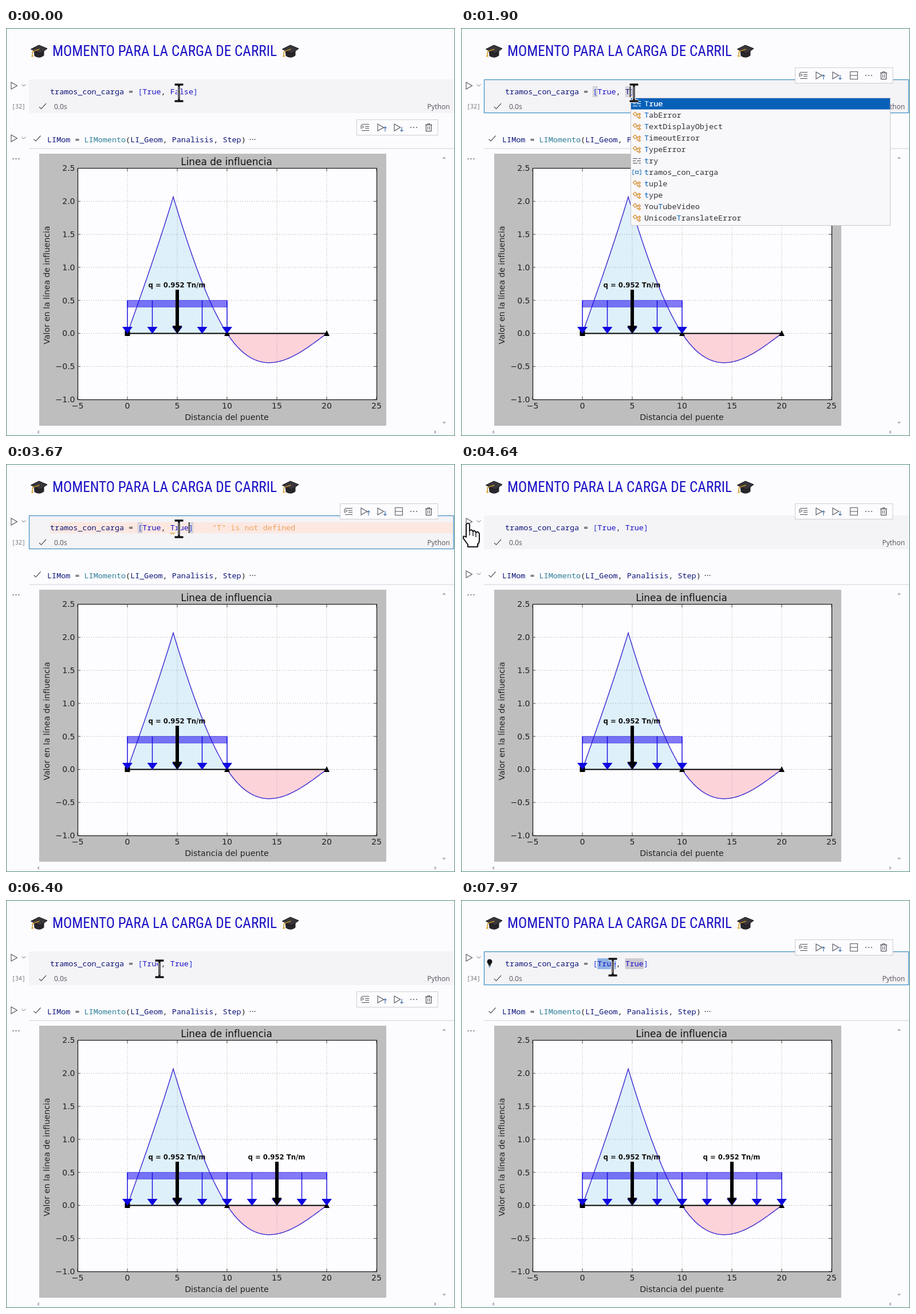
An HTML page with a canvas that plays this animation: 784 px wide and 714 px high, repeating every 8 s.

```html
<!DOCTYPE html>
<html lang="es">
<head>
<meta charset="utf-8">
<title>Línea de influencia</title>
<style>
html, body { margin: 0; width: 100%; height: 100%; overflow: hidden; background: #fcfcfe; }
canvas { display: block; width: 784px; height: 714px; }
</style>
</head>
<body>
<canvas id="stage" width="784" height="714"></canvas>
<script>
const c = document.getElementById('stage').getContext('2d');
const LOOP = 8000;
const MONO = '13.44px "Noto Sans Mono", "DejaVu Sans Mono", monospace';
const UI = '12px "Open Sans", "Noto Sans", sans-serif';
const plotFont = (px, weight = '') => `${weight} ${px}px "DejaVu Sans", sans-serif`;
const INK = '#55525c', NAVY = '#0c1478', BLUE = '#1a10c4', TEAL = '#2f7f99';

// ---- helpers ----
function rect(x, y, w, h, fill, stroke, lw = 1) {
  if (fill) { c.fillStyle = fill; c.fillRect(x, y, w, h); }
  if (stroke) { c.strokeStyle = stroke; c.lineWidth = lw; c.strokeRect(x, y, w, h); }
}

function path(points, stroke, lw = 1, fill, close) {
  c.beginPath();
  points.forEach(([x, y]) => c.lineTo(x, y));
  if (close) c.closePath();
  if (fill) { c.fillStyle = fill; c.fill(); }
  if (stroke) { c.strokeStyle = stroke; c.lineWidth = lw; c.stroke(); }
}

function dot(x, y, r, fill) {
  c.beginPath();
  c.arc(x, y, r, 0, 7);
  c.fillStyle = fill;
  c.fill();
}

function text(s, x, y, font, color, align = 'left') {
  c.font = font;
  c.fillStyle = color;
  c.textAlign = align;
  c.fillText(s, x, y);
}

function tokens(list, x, y) {
  for (const [s, color] of list) {
    text(s, x, y, MONO, color);
    x += c.measureText(s).width;
  }
}

function at(x, y, draw) {
  c.save();
  c.translate(x, y);
  draw();
  c.restore();
}

// ---- small icons, drawn around their centre ----
const play = (x, y, s = 1) =>
  path([[x - 5 * s, y - 6 * s], [x + 5.5 * s, y], [x - 5 * s, y + 6 * s]], INK, 1.1, null, true);
const chevron = (x, y) => path([[x - 3.5, y - 1.5], [x, y + 2], [x + 3.5, y - 1.5]], '#77747c', 1);
const check = (x, y) => path([[x - 6, y + 1], [x - 2.5, y + 4.5], [x + 6, y - 5]], INK, 1.2);
const dots = (x, y, gap = 5) => [-gap, 0, gap].forEach(d => dot(x + d, y, 1, INK));

function arrowMark(x, y, dir) {
  path([[x, y - 4], [x, y + 4]], '#3568a8', 1.1);
  path([[x - 2.5, y + 1.5 * dir], [x, y + 4 * dir], [x + 2.5, y + 1.5 * dir]], '#3568a8', 1.1);
}

const toolIcons = {
  line(x, y) {
    path([[x - 7, y - 4], [x - 2, y - 1], [x - 7, y + 2]], INK, 1, null, true);
    path([[x - 6, y - 5.5], [x + 7, y - 5.5]], INK);
    [-1.5, 1.5].forEach(d => path([[x, y + d], [x + 7, y + d]], INK));
    path([[x - 6, y + 5.5], [x + 7, y + 5.5]], INK);
  },
  above(x, y) { play(x - 2, y); arrowMark(x + 6, y + 3, -1); },
  below(x, y) { play(x - 2, y); arrowMark(x + 6, y + 3, 1); },
  split(x, y) {
    rect(x - 6.5, y - 6.5, 13, 13, null, INK);
    path([[x - 6.5, y], [x + 6.5, y]], INK);
  },
  more(x, y) { dots(x, y); },
  trash(x, y) {
    path([[x - 6, y - 4.5], [x + 6, y - 4.5]], INK, 1.2);
    path([[x - 2, y - 5], [x - 2, y - 6.5], [x + 2, y - 6.5], [x + 2, y - 5]], INK);
    rect(x - 4.5, y - 4.5, 9, 11, null, INK, 1.2);
    [-1.5, 1.5].forEach(d => path([[x + d, y - 2], [x + d, y + 4]], INK));
  }
};

function toolbar(cell) {
  const first = cell === 1, y = first ? 69.5 : 160.5, left = first ? 583.5 : 612.5;
  rect(left, y, 754 - left, 27, '#fcfcfe', '#cfccd2');
  const names = first ? ['line', 'above', 'below', 'split', 'more', 'trash']
                      : ['line', 'above', 'below', 'more', 'trash'];
  const xs = first ? [598, 627, 656, 686, 712, 738] : [627, 656, 685, 712, 738];
  names.forEach((n, i) => toolIcons[n](xs[i], y + 13.5));
}

function spinner(x, y, t) {
  at(x, y, () => {
    c.rotate(t / 160);
    for (let i = 0; i < 2; i++) {
      c.rotate(Math.PI);
      c.beginPath();
      c.arc(0, 0, 5, .3, 2.8);
      c.strokeStyle = INK;
      c.lineWidth = 1.2;
      c.stroke();
      path([[5, -1.5], [4.8, 2], [1.5, 1.5]], INK, 1.1);
    }
  });
}

// ---- heading ----
function gradCap(x) {
  at(x, 40, () => {
    c.beginPath();
    c.moveTo(-9, 0);
    c.lineTo(-8, 9);
    c.quadraticCurveTo(1, 15, 9, 8);
    c.lineTo(9, 0);
    c.fillStyle = '#28262a';
    c.fill();
    path([[-14, -3], [0, -10], [14.5, -4], [2, 5]], '#161417', 1, '#39363b', true);
    path([[1, -3], [-11, 1], [-11.5, 6]], '#c9952c', 1.5);
    path([[-11.5, 4], [-13.5, 10.5], [-9.5, 10.5]], null, 1, '#dba936', true);
  });
}

function heading() {
  const s = 'MOMENTO PARA LA CARGA DE CARRIL';
  const face = px => `condensed ${px}px "Roboto Condensed", "Liberation Sans Narrow", "Open Sans Condensed", Roboto, sans-serif`;
  c.font = face(100);
  const size = Math.min(27, 39200 / c.measureText(s).width);
  text(s, 81, 49.3, face(size), BLUE);
  gradCap(57.5);
  gradCap(496.5);
}

// ---- chart ----
const px = v => 212 + 17.4 * v;
const py = v => 534.5 - 115.6 * v;
const SECTION = 4.6, SPAN = 10;

// Bending moment influence line of a two-span continuous beam
function influence(x) {
  const u = x <= SPAN ? x : 2 * SPAN - x;
  const support = SECTION / SPAN * u * (SPAN ** 2 - u ** 2) / (4 * SPAN ** 2);
  if (x > SPAN) return -support;
  return Math.min(x * (SPAN - SECTION), SECTION * (SPAN - x)) / SPAN - support;
}

function curve(from, to, fill) {
  const pts = [];
  for (let i = 0; i <= 100; i++) {
    const x = from + (to - from) * i / 100;
    pts.push([px(x), py(influence(x))]);
  }
  path(pts, null, 1, fill, true);
  return pts;
}

function arrow(x, top, color, shaft, half, head) {
  const base = py(0) + .5;
  path([[x, top], [x, base - head]], color, shaft);
  path([[x - half, base - head], [x + half, base - head], [x, base]], null, 1, color, true);
}

function load(start) {
  const top = py(.5);
  rect(px(start), top, 174, py(.4) - top, 'rgba(20,0,240,.52)', '#4a40e0', .8);
  for (let i = 0; i <= 4; i++) arrow(px(start + 2.5 * i), top, '#1008e0', 1.4, 9, 12);
  const mid = px(start + 5);
  arrow(mid, 458, '#000', 6, 8.5, 14);
  text('q = 0.952 Tn/m', mid - .5, 454, plotFont(11.7, 'bold'), '#111', 'center');
}

function chart(spans) {
  rect(58, 220, 606, 476, '#bebebf');
  rect(125, 245.5, 522, 404.6, '#fdfdff');
  const left = curve(0, 10, '#def0fa'), right = curve(10, 20, '#fdd3da');

  c.setLineDash([1, 3]);
  for (let v = 0; v <= 20; v += 5) path([[px(v), 245.5], [px(v), 650]], '#8e8c88', .9);
  for (let v = -.5; v < 2.5; v += .5) path([[125, py(v)], [647, py(v)]], '#8e8c88', .9);
  c.setLineDash([]);

  c.lineJoin = 'miter';
  path([...left, ...right], '#4632d2', 1.5);
  path([[px(0), py(0)], [px(20), py(0)]], '#000', 2);
  rect(207.5, 530, 9, 9, '#000');
  [10, 20].forEach(v => path([[px(v), 529], [px(v) + 5, 539], [px(v) - 5, 539]], null, 1, '#000', true));
  for (let i = 0; i < spans; i++) load(10 * i);

  rect(125.5, 245.5, 522, 405, null, '#111', 1.2);
  const label = v => String(v).replace('-', '−');
  for (let v = -5; v <= 25; v += 5) {
    path([[px(v), 650], [px(v), 645]], '#222', .8);
    path([[px(v), 246], [px(v), 251]], '#222', .8);
    text(label(v), px(v), 666, plotFont(14), '#222', 'center');
  }
  for (let v = -1; v <= 2.5; v += .5) {
    path([[125, py(v)], [130, py(v)]], '#222', .8);
    path([[647, py(v)], [642, py(v)]], '#222', .8);
    text(label(v.toFixed(1)), 120.5, py(v) + 4.8, plotFont(14), '#222', 'right');
  }
  text('Linea de influencia', 385, 240, plotFont(16.9), '#111', 'center');
  text('Distancia del puente', 385.5, 686, plotFont(14.2), '#222', 'center');
  at(75.5, 450, () => {
    c.rotate(-Math.PI / 2);
    text('Valor en la línea de influencia', 0, 0, plotFont(14), '#222', 'center');
  });
}

// ---- suggestion list ----
const lists = {
  T: ['k:True', 'c:TabError', 'c:TextDisplayObject', 'c:TimeoutError', 'c:TypeError', 'k:try',
      'v:tramos_con_carga', 'c:tuple', 'c:type', 'c:YouTubeVideo', 'c:UnicodeTranslateError'],
  Tu: ['c:tuple', 'c:YouTubeVideo', 'k:True', 'c:TimeoutError']
};

const kindIcons = {
  k(x, y, color) {
    [-4, 0, 4].forEach((d, i) => {
      path([[x - 7, y + d], [x + (i === 1 ? -2 : 1), y + d]], color, 1.2);
      path([[x + (i === 1 ? 0 : 3), y + d], [x + 7, y + d]], color, 1.2);
    });
  },
  c(x, y, color) {
    const box = (dx, dy, r) =>
      path([[x + dx - r, y + dy], [x + dx, y + dy - r], [x + dx + r, y + dy], [x + dx, y + dy + r]], color, 1.2, null, true);
    box(-3, -2, 3.5);
    box(4.5, -1.5, 2);
    box(4.5, 4, 2);
    path([[x, y - 1.5], [x + 2.5, y - 1.5]], color, 1.1);
    path([[x + .5, y - 1], [x + .5, y + 4], [x + 2.5, y + 4]], color, 1.1);
  },
  v(x, y, color) {
    [-1, 1].forEach(s => path([[x + 4.5 * s, y - 4], [x + 7 * s, y - 4], [x + 7 * s, y + 4], [x + 4.5 * s, y + 4]], color, 1.1));
    rect(x - 2.5, y - 2, 5, 4, null, color, 1.2);
  }
};
const kindColor = { k: '#5a5760', c: '#d58a2a', v: '#2878b8' };

function popup(query) {
  const rows = lists[query], x = query === 'T' ? 296 : 305;
  rect(x + .5, 122.5, 453, rows.length * 20 + 3, '#f8f7fa', '#c9c6cd');
  rect(x + 1, 123, 452, 19.5, '#0760b8');
  rows.forEach((row, i) => {
    const [kind, word] = row.split(':'), y = 132.5 + 20 * i;
    kindIcons[kind](x + 11, y, i ? kindColor[kind] : '#fff');
    let q = 0;
    const parts = [...word].map(ch => {
      const hit = q < query.length && ch.toLowerCase() === query[q].toLowerCase();
      if (hit) q++;
      return [ch, i ? (hit ? '#0a66ba' : '#333038') : (hit ? '#bfe4ff' : '#fff')];
    });
    tokens(parts, x + 24, y + 4.7);
    if (!i) tokens(parts, x + 24.3, y + 4.7);
  });
}

// ---- timeline ----
const steps = [
  [0, { word: 'False', run: 32, bar: 2, spans: 1, play2: true }],
  [700, { focus: true, bar: 1, play2: false, mark: 'False' }],
  [1500, { word: 'T', mark: '', caret: true, popup: 'T' }],
  [2480, { word: 'Tu', popup: 'Tu' }],
  [2860, { lens: 'Tu' }],
  [3200, { word: 'T', popup: '', lens: 'T' }],
  [3360, { word: 'Tr' }],
  [3460, { word: 'Tru' }],
  [3560, { word: 'True' }],
  [3960, { lens: '' }],
  [4600, { run: 33, focus: false, caret: false, play2: true }],
  [5260, { run: 34, busy: true }],
  [5760, { busy: false, spans: 2 }],
  [5900, { bar: 2 }],
  [7100, { focus: true, bar: 1, play2: false, caret: false }],
  [7300, { mark: 'True' }],
  [7700, { bulb: true }]
];
const stateAt = t => Object.assign({}, ...steps.filter(s => s[0] <= t).map(s => s[1]));

const mouseKeys = [[0, 302, 113], [3900, 302, 113], [4400, 12, 104], [4800, 12, 104], [5150, 10, 196],
  [5700, 10, 196], [6250, 268, 120], [6700, 268, 120], [7050, 265, 117], [LOOP, 265, 117]];

function mouseAt(t) {
  const i = mouseKeys.findIndex(k => k[0] > t);
  const [t0, x0, y0] = mouseKeys[i - 1], [t1, x1, y1] = mouseKeys[i];
  const u = (t - t0) / (t1 - t0), e = u * u * (3 - 2 * u);
  return [x0 + (x1 - x0) * e, y0 + (y1 - y0) * e];
}

function beam() {
  for (const [color, lw] of [['#fff', 6], ['#161418', 3.6]]) {
    path([[-7.5, -14], [7.5, -14]], color, lw);
    path([[-7.5, 15], [7.5, 15]], color, lw);
    path([[0, -14], [0, 15]], color, lw);
  }
  path([[0, -10], [0, 11]], '#e8e6ec', .9);
}

function hand() {
  c.beginPath();
  c.moveTo(-3, 20);
  c.lineTo(-3, 2);
  c.quadraticCurveTo(0, -3, 3, 2);
  c.lineTo(3, 13);
  c.quadraticCurveTo(6, 9, 9, 14);
  c.quadraticCurveTo(12, 11, 14, 16);
  c.quadraticCurveTo(18, 13, 20, 18);
  c.lineTo(20, 29);
  c.quadraticCurveTo(20, 34, 17, 36);
  c.lineTo(17, 41);
  c.lineTo(0, 41);
  c.lineTo(0, 37);
  c.lineTo(-8, 26);
  c.quadraticCurveTo(-9, 20, -3, 24);
  c.closePath();
  c.lineJoin = 'round';
  c.fillStyle = '#fff';
  c.fill();
  c.strokeStyle = '#151317';
  c.lineWidth = 2;
  c.stroke();
  [[3, 13], [9, 14], [14, 16]].forEach(([x, y]) => path([[x, y], [x, y + 8]], '#151317', 1.4));
}

// ---- notebook cells ----
function firstCell(s, t) {
  rect(40, 90, 743, 59, '#f4f3f6');
  if (s.lens) rect(77, 102, 704, 19, '#fce8e1');
  if (s.focus) rect(40.5, 90.5, 741, 58, null, '#4592c8', 1.3);
  play(14, 101);
  chevron(31, 100);
  c.font = MONO;
  const cw = c.measureText('0').width, wordX = 77 + 26 * cw, endX = wordX + s.word.length * cw;

  if (s.mark === 'True') {
    rect(77 + 20 * cw, 102, 4 * cw, 19, '#90b4e4');
    rect(wordX, 102, 4 * cw, 19, '#cfcbd3');
  } else if (s.mark) {
    rect(wordX, 102, s.word.length * cw, 19, '#90b4e4');
  }
  if (s.popup === 'T') rect(wordX, 102, cw, 19, '#d8d5da');
  if (s.caret) [77 + 19 * cw, endX].forEach(x => rect(x + .5, 102.5, cw - 1, 18, '#dedbe0', '#bbb8c0', .8));

  tokens([['tramos_con_carga', NAVY], [' = ', '#222'], ['[', '#2638d0'], ['True', BLUE], [', ', '#222'],
    [s.word, s.word.length > 3 ? BLUE : NAVY], [']', '#2638d0']], 77, 115.8);
  if (s.caret) rect(endX, 102, 1.5, 19, '#111');
  if (s.lens) {
    text(`"${s.lens}" is not defined`, s.lens === 'Tu' ? 336 : 360, 115.8, MONO, '#eaa260');
    const wave = [];
    for (let x = 0; x <= s.lens.length * cw; x += 2) wave.push([wordX + x, 121 + (x % 4 ? 1.5 : -.5)]);
    path(wave, '#dda23c', 1.1);
  }
  if (s.bulb) {
    dot(50, 108, 4.5, '#161418');
    rect(48, 111, 4, 4, '#161418');
    rect(48.5, 116, 3, 1.5, '#2d6cb0');
  }
  text(`[${s.run}]`, 10, 141, '10px "Noto Sans Mono", monospace', '#77747c');
  if (s.busy) spinner(64.5, 137.5, t); else check(64, 137);
  text('0.0s', 84, 142, UI, INK);
  text('Python', 775, 142, UI, INK, 'right');
}

function secondCell(s, hover) {
  if (hover) rect(2, 181, 37, 23, '#dcdade');
  if (s.play2) {
    play(14, 193);
    chevron(31, 192);
  }
  check(54.5, 193.5);
  tokens([['LIMom', NAVY], [' = ', '#222'], ['LIMomento', TEAL], ['(', '#222'], ['LI_Geom', NAVY], [', ', '#222'],
    ['Panalisis', NAVY], [', ', '#222'], ['Step', NAVY], [')', '#222']], 72, 199.8);
  dots(430.5, 195, 4);
  rect(40, 210.5, 743, 1, '#d3d0d6');
  dots(17.5, 229);
}

function scrollMarks() {
  const marks = [[765, 227, 0], [765, 691, Math.PI], [56, 707, -Math.PI / 2], [750, 707, Math.PI / 2]];
  for (const [x, y, a] of marks) at(x, y, () => {
    c.rotate(a);
    path([[-3.5, 2], [0, -2], [3.5, 2]], null, 1, '#b9b3c6', true);
  });
}

function draw(now) {
  const t = now % LOOP, s = stateAt(t), [mx, my] = mouseAt(t);
  rect(0, 0, 784, 714, '#fcfcfe');
  c.lineJoin = 'miter';
  heading();
  firstCell(s, t);
  secondCell(s, mx < 40 && my > 170);
  chart(s.spans);
  scrollMarks();
  toolbar(s.bar);
  if (s.popup) popup(s.popup);
  rect(.5, .5, 783, 713, null, '#4f8c79');
  at(mx, my, mx < 40 ? hand : beam);
}

const start = performance.now();
function tick() {
  draw(performance.now() - start);
  requestAnimationFrame(tick);
}
tick();
</script>
</body>
</html>
```
